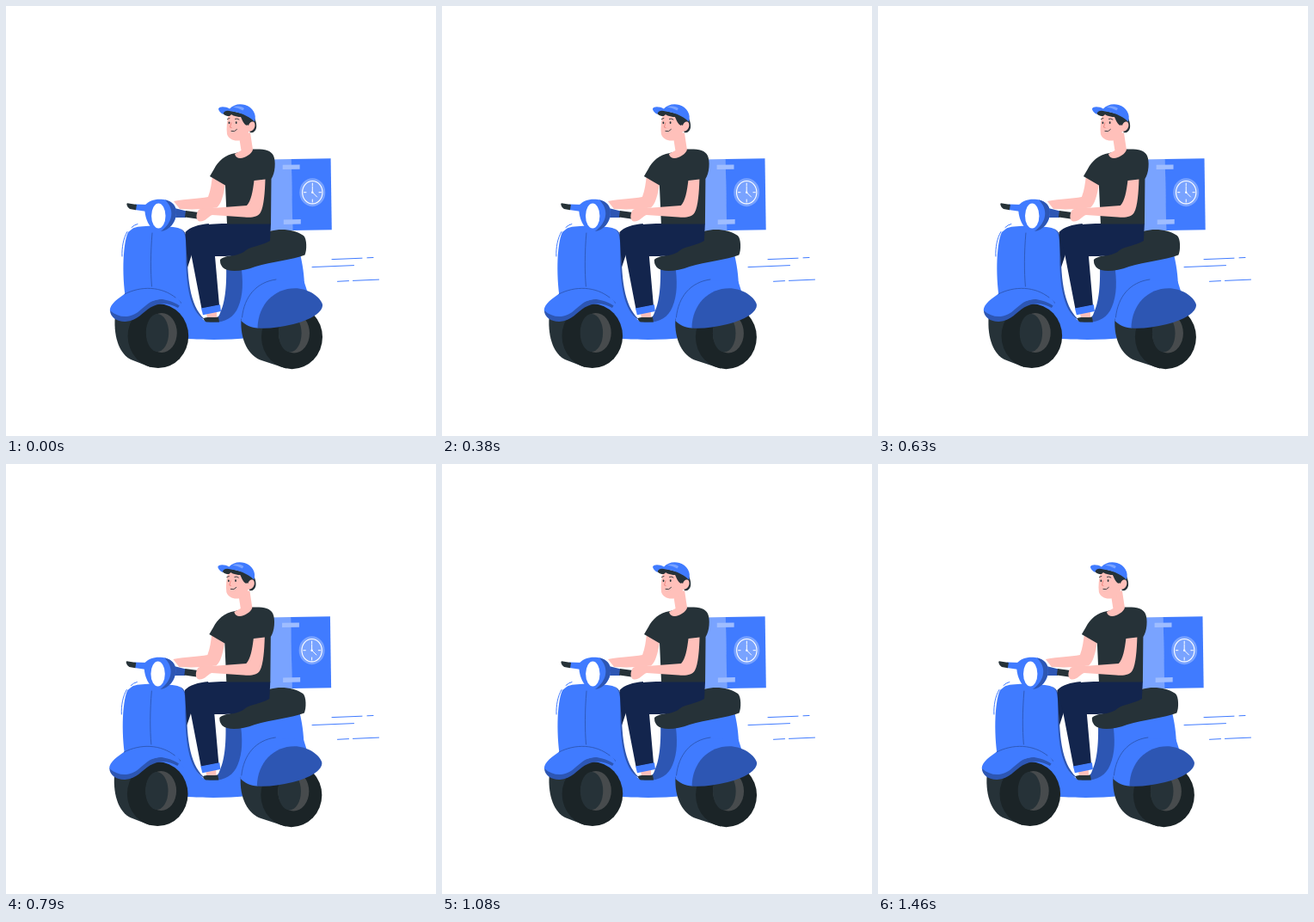
An HTML page for the animation above (1.5 s loop, 500x500 px).

```html
<!DOCTYPE html>
<html lang="en">
<head>
<meta charset="utf-8">
<title>Delivery scooter</title>
<style>
  html, body { margin: 0; width: 100%; height: 100%; overflow: hidden; background: #fff; }
  svg { display: block; width: 100%; height: 100%; }
  .blue { fill: #407bff; }
  .deep { fill: #2d56b3; }
  .navy { fill: #13254d; }
  .dark { fill: #263238; }
  .tyre { fill: #1b2427; }
  .skin { fill: #ffc0ba; }
  .pale { fill: #79a3ff; }
  .strap { fill: #9fbdff; }
  .line { fill: none; stroke: #407bff; stroke-linecap: round; }
  .crease { fill: none; stroke: #2d56b3; stroke-width: .9; stroke-linecap: round; }
  .white { fill: none; stroke: #fff; stroke-linecap: round; }
  .ink { fill: none; stroke: #263238; stroke-width: .9; stroke-linecap: round; }
</style>
</head>
<body>
<svg viewBox="0 0 500 500">
  <path class="line" d="M379 294.6L414 293.2M420 292.8L427 292.5M356 303.6L404.5 301.6M385.5 320.3L398.5 319.6M403.5 319.4L433.5 318.1"/>

  <g id="ride">
    <g id="box">
      <path class="pale" d="M306 178.4L332.2 178L333.6 261L306 261.5Z"/>
      <path class="blue" d="M331.8 178L377.6 177.2L378.8 260.3L333.3 261Z"/>
      <path class="strap" d="M321.7 184.8L341.6 184.5V189.7L321.7 190ZM322.8 248.4L342.8 248V253.6L322.8 254Z"/>
      <ellipse class="pale" cx="356.3" cy="216.7" rx="15" ry="16.5"/>
      <ellipse class="white" cx="356.3" cy="216.7" rx="11.7" ry="13.2" stroke-width="1.1"/>
      <path class="white" stroke-width="1" d="M356.3 206V209M356.3 225V228M346.5 216.7H349M364 216.7H366.5M356.3 210V216.7L361.6 222"/>
      <circle cx="356.3" cy="216.7" r="1.2" fill="#fff"/>
    </g>

    <path class="blue" d="M147 259C155 254 188 256 200 258C207 260 210 266 210 277C209 322 214 356 233 367L250 366L268 300L341 284C345 300 347 314 347 328L300 374L285 385.5C255 389 230 388 211 387L180 352L140 345C135 320 135 278 142 263Z"/>
    <path class="deep" d="M202 258.5C209 261 211 268 210.7 280C210.7 322 215 353 234 366.5C215 359 208.500 329 209.2 281C209.5 268 208 262 202 258.5Z"/>
    <path class="deep" d="M256 299C257 330 254 346 249 357C247 363 242 367 234 367.5C252 370 265 363 270 350C276 336 276 320 273 299Z"/>
    <path class="crease" d="M170 264C168 287 168 309 169.5 326"/>

    <g id="rear-wheel">
      <path class="dark" d="M273.5 364C272 388 282 407 297 412L326 421.5L340 352L285 348Z"/>
      <ellipse class="tyre" cx="332.5" cy="385" rx="35.5" ry="37.2"/>
      <ellipse cx="335" cy="380.5" rx="18" ry="23" fill="#474b4d"/>
      <ellipse class="dark" cx="330.3" cy="380.5" rx="13.3" ry="22"/>
    </g>
    <path class="blue" d="M273.500 366C275 340 289 324 312 319L346.500 320L350 331L293 374.500C285 374 278 371 273.500 366Z"/>
    <path class="crease" d="M274.500 362C277 338 291 321 314 318"/>
    <path class="deep" d="M292.500 374.500C293 347 312 328.200 336 328.200C351 328.200 365 337.500 368 347C369 356 354 365 334 370C318 374 304 375.500 292.500 374.500Z"/>

    <g id="front-wheel">
      <path class="dark" d="M126.700 362C125 387 133 405 145 411L168 420L190 349L150 347Z"/>
      <ellipse class="tyre" cx="176.900" cy="383.700" rx="35.300" ry="37.400"/>
      <ellipse cx="181" cy="380" rx="17.800" ry="23" fill="#474b4d"/>
      <ellipse class="dark" cx="176" cy="380" rx="13.200" ry="22"/>
    </g>
    <path class="deep" d="M121 354C121 362 130 367.500 139 367C153 366 159 356 168 350.500C178 345 189 344.500 200 351L204 345L196 337Z"/>
    <path class="blue" d="M120.800 354C121 346.500 130 340 141 333C163 324.500 186 327 200 340L209 355C201 345.500 190 342.500 182 341C171 340.500 165 346 158 352C147 363 133 364.500 120.800 354Z"/>
    <path class="crease" d="M138 335C157 325 181 326 197 339"/>

    <path class="dark" d="M249 295C253 290 268 291 279 283C289 275 299 266 308 261.500C321 258 337 260.500 346 267C350 270.500 350 284 347.500 289.500C333 295 309 297.500 290 303C274 309 258 310 252 304C249 300 249 298 249 295Z"/>

    <g id="legs">
      <path class="navy" d="M208.500 263C214 257 224 254 236 253L232 282L216 289L211 304Z"/>
      <path class="skin" d="M233 356L245 354L245 364H234Z"/>
      <path class="dark" d="M230 363C234 361 240 363 247 361.5L248 367.5H233C231 367 230 365 230 363Z"/>
      <path class="navy" d="M210 265C216 257 229 253 256 253H308L307 273C297 279 286 279 279 284C270 292 255 291 243 291L248 348L227.5 352L215 287C213 278 211 273 210 265Z"/>
      <path class="blue" d="M227 351.5L249 347.3L250 355L229 359.2Z"/>
    </g>

    <g id="handlebar">
      <path class="blue" d="M150 230.5L165 231L164 239L150 237Z"/>
      <path class="deep" d="M192 234L210 238.5L209 246L192 246Z"/>
      <path class="dark" d="M141 229.300L152 231L151 237.200L144 236C141 234 139.500 230 141 229.300ZM209 238L224 240L222 247.500L208 245.500Z"/>
      <path class="blue" d="M161.500 232C166 226 174 224 183 225C192 226 198 232 198 240C198 251 190 262 178 262C167 262 160 245 161.500 232Z"/>
      <path class="deep" d="M185 225.500C193 227 198 232 198 240C198 251 190 261 180 262C195 251 196 236 185 225.500Z"/>
      <ellipse cx="177.300" cy="244" rx="8.200" ry="14.600" fill="#fff"/>
    </g>

    <path class="skin" d="M240 197L255 207C253 220 250 231 245 234.500C230 236.500 214 237 202 236L195 227C210 224 224 224 235 222C238 214 239 206 240 197Z"/>
    <path class="dark" d="M267 171C254 173 246.500 181 242 189.500L237 198L255 208.5L257 253.5H308L308.5 201C313 195 314 180 311 174C308 167 299 166 286 166.5Z"/>
    <path class="skin" d="M288.500 203L301.500 201.500C301 216 300 233 296 240C293 246 285 246 277 245.500L240 243C236 244 232 251 225 250.500C220 249 221 241 224 237C230 234 235 235 240 235L280 232C285 227 287 215 288.500 203Z"/>

    <g id="head">
      <path class="skin" d="M271 152L273.5 168L266 172C267 177 272 178 277 176C282 174 286 171 287 167L284 147Z"/>
      <path class="dark" d="M262 122L288 128C290 132 292 138 291 142C290 146 287 148 284 147L278 138Z"/>
      <path class="skin" d="M259 125C257 133 256 142 257 149C259 155 266 158 273 156C279 154 282 151 282 146C287 146 291 141 289 136C287 133 283 135 282 139C278 137 276 133 274 128Z"/>
      <path class="dark" d="M259 122L288 129L284 135C282 136 281 138 280 139C276 137 275 133 273 129C267 129 261 127 259 122Z"/>
      <path class="dark" d="M251 122.5C252 126.500 257 128.500 260 128C262 125 266 124 271 125L257 120Z"/>
      <path class="blue" d="M247 119.5C248.500 116 256 117 260 119.500C264 115 271 113 278 115C287 118 292 126 289 134.5C281 127 271 123.500 262 122.5C257 121 253 122 252.500 126C249 124 247 121.500 247 119.500Z"/>
      <path class="pale" d="M264 117.8C268 115.6 274 116 277 119L275.5 121.5C272 119.5 268 118.5 264 117.8Z"/>
      <ellipse class="dark" cx="259.5" cy="135.8" rx=".9" ry="1.4"/>
      <ellipse class="dark" cx="267.7" cy="135.7" rx=".9" ry="1.4"/>
      <path class="ink" d="M257.5 131.5L260 130.5M266.5 131.3Q269 130.3 271 132M262 145.5Q266 147 268.5 143.5"/>
      <path d="M262 135.5L260.5 141L262.5 141.5" fill="none" stroke="#ed847e" stroke-width=".9"/>
    </g>

    <path class="line" d="M141 262.5C136.5 270 134.5 281 135 291M146 257.5Q149 254.5 153 253.5"/>
  </g>
</svg>
<script>
  const LOOP = 1500, FRAMES = 36, STEP = LOOP / FRAMES;
  // Horizontal shake: one stop per tenth of the loop.
  const stops = [0, -1, 2, -4, 4, -4, 4, -4, 2, -1, 0];
  const ride = document.getElementById('ride');

  // Same curve as CSS ease-out: cubic-bezier(0, 0, .58, 1).
  function easeOut(x) {
    let lo = 0, hi = 1;
    for (let i = 0; i < 20; i++) {
      const s = (lo + hi) / 2;
      if (1.74 * s * s - 0.74 * s ** 3 < x) lo = s; else hi = s;
    }
    return lo * lo * (3 - 2 * lo);
  }

  function shift(p) {
    const i = Math.min(9, Math.floor(p * 10));
    return stops[i] + (stops[i + 1] - stops[i]) * easeOut(p * 10 - i);
  }

  function draw() {
    const t = performance.now() % LOOP;
    // Held at 24 pictures a second; the bias absorbs rounded delays.
    const frame = Math.floor(t / STEP + 0.1) % FRAMES;
    ride.setAttribute('transform', `translate(${shift(frame / FRAMES).toFixed(3)} 0)`);
    requestAnimationFrame(draw);
  }
  draw();
</script>
</body>
</html>
```
